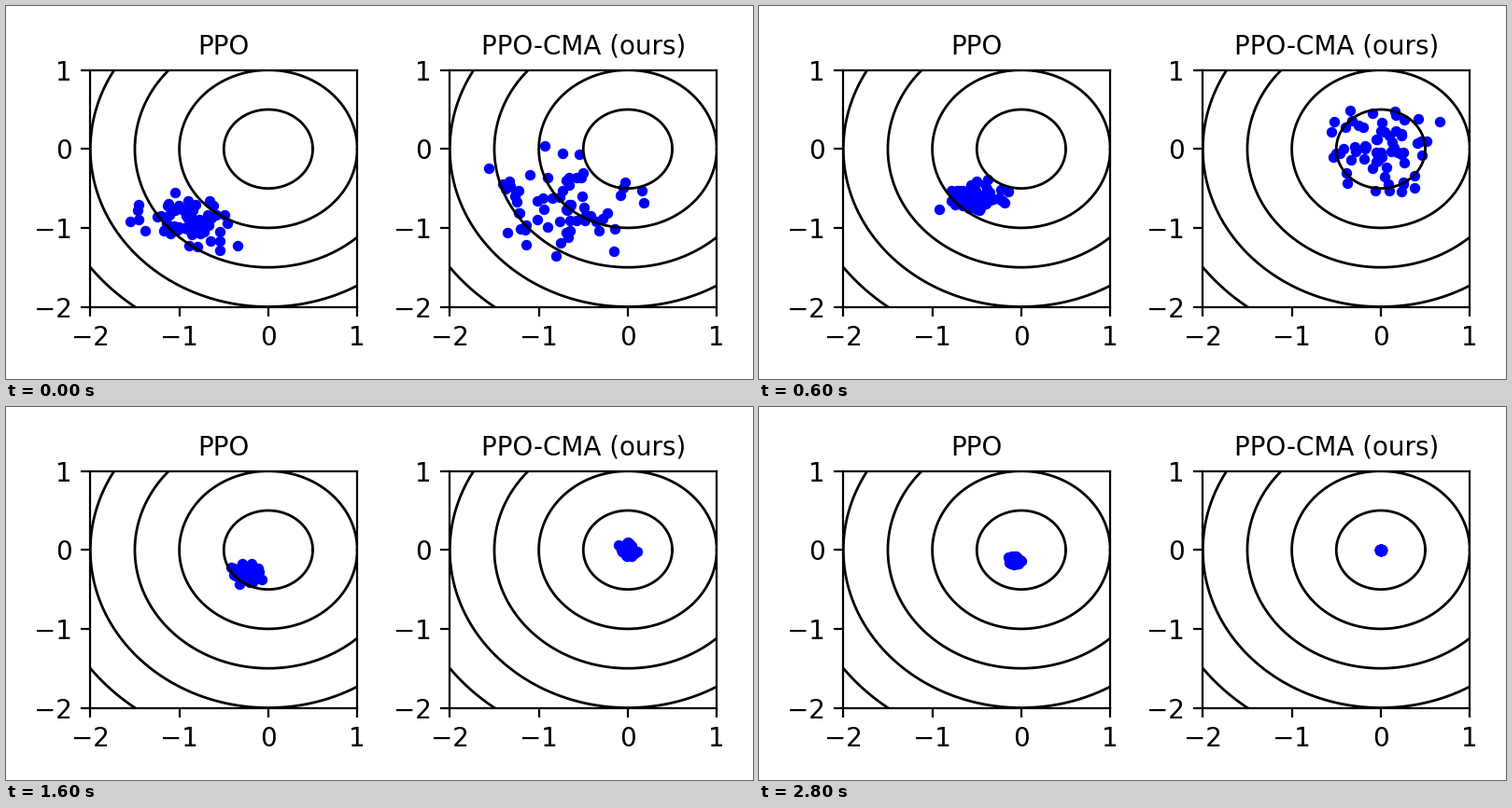
Recreate the animation shown at these times as a matplotlib script. Size 800x400 px, loop 3 s.

```python
import numpy as np
import matplotlib.pyplot as plt
from matplotlib.animation import FuncAnimation

STEPS, INTERVAL = 15, 200
W, H, DPI = 800, 400, 200
COUNT = 64

plt.rcParams.update({"font.family": "DejaVu Sans", "font.size": 10})


def ppo(step):
    """Mean and spread both shrink slowly towards the optimum."""
    mean = np.array([-.9, -.92]) * np.exp(np.array([-.175, -.14]) * step)
    spread = np.array([.25, .17]) * np.exp(np.array([-.15, -.135]) * step)
    return mean, spread


def ppo_cma(step):
    """Mean reaches the optimum in two steps, then the spread collapses."""
    mean = np.array([-.75, -.7]) * max(0, 1 - step / 2)
    spread = np.array([.39, .34]) * np.exp(-.37 * max(0, step - 2))
    return mean, spread


def samples(policy, step, seed):
    rng = np.random.default_rng([seed, step])
    # Three summed uniforms: bell shaped, unit variance, no far tails
    z = rng.uniform(-1, 1, (3, COUNT, 2)).sum(axis=0)
    mean, spread = policy(step)
    return mean + spread * (z - z.mean(axis=0))


def panel(ax, title):
    ax.set(xlim=(-2, 1), ylim=(-2, 1), xticks=range(-2, 2), yticks=range(-2, 2))
    ax.set_title(title, fontsize=10)
    t = np.linspace(0, 2 * np.pi, 361)
    for r in np.arange(.5, 3, .5):
        ax.plot(r * np.cos(t), r * np.sin(t), color="black", lw=1, zorder=2)
    dots, = ax.plot([], [], "o", color="blue", ms=4.1, mew=0, zorder=1)
    return dots


fig, axes = plt.subplots(1, 2, figsize=(W / DPI, H / DPI), dpi=DPI,
                         facecolor="white")
panels = [
    (panel(axes[0], "PPO"), ppo),
    (panel(axes[1], "PPO-CMA (ours)"), ppo_cma),
]
fig.tight_layout()


def draw(step):
    for seed, (dots, policy) in enumerate(panels):
        dots.set_data(*samples(policy, step, seed).T)
    return [dots for dots, _ in panels]


anim = FuncAnimation(fig, draw, frames=STEPS, interval=INTERVAL, repeat=True,
                     repeat_delay=0, blit=False)
plt.show()
```
